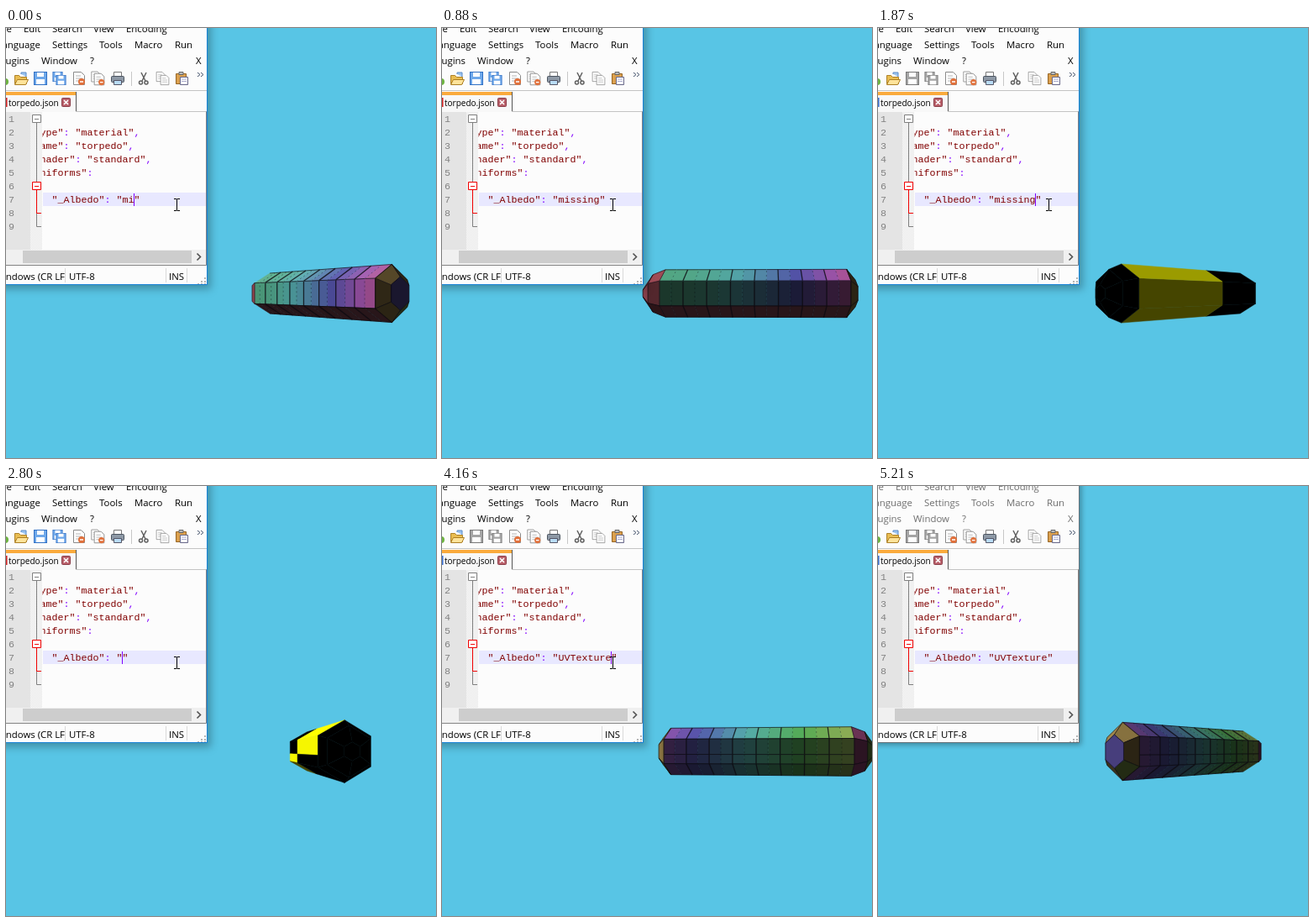
Write an HTML page with a canvas that moves like this. It is 512 px wide and 512 px high and loops after 5.31 s.

```html
<!DOCTYPE html>
<html lang="en">
<head>
<meta charset="utf-8">
<title>Live material editing</title>
<style>
  html, body { margin: 0; width: 100%; height: 100%; overflow: hidden; background: #58c5e5; }
  canvas, svg { position: absolute; left: 0; top: 0; width: 512px; height: 512px; }
  #frame { fill: #fcfcfc; stroke: #1883d7; filter: drop-shadow(4px 5px 5px #0004); }
  #ui, #tab { font: 11.4px "Open Sans", "Noto Sans", sans-serif; }
  #tab { font-size: 10px; }
  #code, #numbers { font: 11.667px "Liberation Mono", monospace; white-space: pre; }
  #code { fill: #800000; }
  #numbers { fill: #808080; }
  .end { text-anchor: end; }
  .punct { fill: #8000ff; }
  .inactive #menu { fill: #6d6d6d; }
  .inactive #frame { stroke: #66727a; filter: drop-shadow(2px 2px 3px #0005); }
  .disk { stroke: #2f6fc4; fill: #6fa8ea; }
  .saved .disk { stroke: #777; fill: #a5a5a5; }
</style>
</head>
<body>
<canvas id="scene" width="512" height="512"></canvas>
<svg id="window" viewBox="0 0 512 512">
  <defs>
    <clipPath id="editor"><rect x="43.5" y="100" width="195" height="163"/></clipPath>
    <pattern id="dots" width="2" height="2" patternUnits="userSpaceOnUse">
      <path d="M0 0h2v2h-2z" fill="#f8f8f8"/><path d="M0 0h1v1h-1zM1 1h1v1h-1z" fill="#e9e9e9"/>
    </pattern>
    <g id="page"><path d="M-6.5-7.5h9l4 4v11h-13z" fill="#fff" stroke="#8a8a8a"/><path d="M-4-3h6M-4 0h8M-4 3h8" stroke="#b5b5b5"/></g>
    <g id="close"><use href="#page"/><circle cx="3" cy="4" r="4" fill="#e0713c"/><path d="M1 4h4" stroke="#fff" stroke-width="1.5"/></g>
    <g id="floppy">
      <rect x="-7.5" y="-7.5" width="15" height="15"/>
      <path d="M-4-7h8v5h-8zM-5 1h10v6h-10z" fill="#fff" stroke="none"/>
    </g>
  </defs>

  <rect id="frame" x="-20" y="-20" width="259.5" height="325.5"/>

  <g id="ui">
    <g id="menu">
      <text class="end" x="7" y="5">File</text><text x="21" y="5">Edit</text><text x="55" y="5">Search</text>
      <text x="104" y="5">View</text><text x="143" y="5">Encoding</text>
      <text class="end" x="41" y="24">Language</text><text x="55" y="24">Settings</text><text x="111" y="24">Tools</text>
      <text x="153" y="24">Macro</text><text x="201" y="24">Run</text>
      <text class="end" x="28" y="43">Plugins</text><text x="42" y="43">Window</text><text x="100" y="43">?</text><text x="226" y="43">X</text>
    </g>

    <circle cx="-1" cy="64" r="4" fill="#6cb33f"/>
    <path d="M10.500 66.500v-10h5l2 2h7v8z" fill="#e9bd52" stroke="#ad8026"/>
    <path d="M10.500 67.500l3-6h13l-3 6z" fill="#ffe39a" stroke="#ad8026"/>
    <path d="M18 55v-2h6v5" fill="#9cc4f0" stroke="#5a8bc8"/>
    <g class="disk">
      <use href="#floppy" x="41" y="60"/>
      <use href="#floppy" transform="translate(61.500 58) scale(.75)"/>
      <use href="#floppy" transform="translate(65.500 62) scale(.75)"/>
    </g>
    <use href="#close" x="87" y="60"/>
    <use href="#page" transform="translate(107 58) scale(.8)"/>
    <use href="#close" transform="translate(111 61) scale(.9)"/>
    <path d="M128.500 58v-5.500h9v5.500" fill="#fff" stroke="#777"/>
    <rect x="125.500" y="57.500" width="15" height="7" rx="1" fill="#8e99a6" stroke="#4c5560"/>
    <path d="M128.500 62.500h9v5h-9z" fill="#b9dcf6" stroke="#556"/>
    <path d="M149.500 52v17" stroke="#c8c8c8"/>
    <g fill="none" stroke="#606060" stroke-width="1.500">
      <path d="M161 53l5 10M167 53l-5 10"/><circle cx="160.500" cy="65" r="2"/><circle cx="167" cy="65" r="2"/>
    </g>
    <use href="#page" transform="translate(184 58) scale(.75)"/><use href="#page" transform="translate(189 62) scale(.75)"/>
    <path d="M202.500 54.500h12v12h-12z" fill="#dba04e" stroke="#946425"/><path d="M206 52.500h5v3h-5z" fill="#bbb" stroke="#666"/>
    <path d="M207.500 58.500h9v9h-9z" fill="#fff" stroke="#668"/><path d="M209 61h6M209 63.500h6" stroke="#aac"/>
    <path d="M228 53l3 2.500-3 2.500M232 53l3 2.500-3 2.500" fill="none" stroke="#42506a"/>

    <path d="M0 74.500h239M83 99.500h156" stroke="#c4c4c4"/>
    <path d="M0 76h83v24h-83z" fill="#f8f8f8"/><path d="M0 76h83v4h-83z" fill="#faaa3c"/>
    <path d="M83.500 76v23" stroke="#555"/>
    <rect id="state" x="0" y="83" width="1.500" height="11"/>
    <text id="tab" x="3" y="93">torpedo.json</text>
    <rect x="66.500" y="83.500" width="10" height="10" rx="1" fill="#b9606a" stroke="#8a3d48"/>
    <path d="M69 86l5 5M74 86l-5 5" stroke="#fff" stroke-width="1.600"/>

    <path d="M0 100h29v164h-29z" fill="#e4e4e4"/><path d="M29 100h14v164h-14z" fill="url(#dots)"/>
    <path d="M44 196h194v16h-194z" fill="#e8e8ff"/>
    <g id="numbers"></g>
    <g fill="none" stroke="#808080">
      <path d="M36.500 113v70M36.500 220v16.500h5.500"/><path d="M31.500 103.500h10v9h-10zM34 108.500h5" fill="#fff"/>
      <g stroke="#f00000"><path d="M36.500 193v27.500h5.500"/><path d="M31.500 183.500h10v9h-10zM34 188.500h5" fill="#fff"/></g>
    </g>
    <g id="code" clip-path="url(#editor)"></g>
    <path id="caret" d="M0 197v15" stroke="#8000ff"/>

    <path d="M0 264h238v18h-238z" fill="#f0f0f0"/><path d="M20 265h201v15h-201z" fill="#cdcdcd"/>
    <path d="M227.500 268.500l4 4-4 4" fill="none" stroke="#505050" stroke-width="1.600"/>
    <path d="M0 282.500h238.500v-183" fill="none" stroke="#828282"/>
    <path d="M70.500 286v17M190.500 286v17M215.500 286v17" stroke="#d9d9d9"/>
    <text class="end" x="70" y="300">Windows (CR LF</text><text x="75" y="300">UTF-8</text><text x="194" y="300">INS</text>
    <path d="M236 297h2v2h-2zM236 301h2v2h-2zM232 301h2v2h-2zM228 304h2v1h-2zM232 304h2v1h-2zM236 304h2v1h-2z" fill="#b4b4b4"/>
  </g>
  <path id="pointer" d="M-3.500-6.500h3l.5 1 .5-1h3M0-6v13M-3.500 7.500h3l.5-1 .5 1h3" fill="none" stroke="#000"/>
</svg>

<script>
const LOOP = 5310, STEP = 58.5, LAST_STEP = 89;
const byId = id => document.getElementById(id);
const ctx = byId("scene").getContext("2d");
const clamp = (v, lo, hi) => Math.max(lo, Math.min(hi, v));
const mix = (a, b, f) => a + (b - a) * f;

// Editor text
const LINE_START = 54.5, CHAR = 7;
const lines = { 2: '"type": "material",', 3: '"name": "torpedo",', 4: '"shader": "standard",', 5: '"uniforms":' };
const baseline = line => 96 + 16 * line;
const colorize = s => s.replace(/[:,]/g, '<tspan class="punct">$&</tspan>');
const textLine = (x, line, s) => `<text x="${x}" y="${baseline(line)}">${colorize(s)}</text>`;

byId("numbers").innerHTML = Array.from({ length: 9 }, (_, i) => textLine(3, i + 1, String(i + 1))).join("");
byId("code").innerHTML = Object.entries(lines).map(([n, s]) => textLine(26.5, +n, s)).join("")
  + `<text id="albedo" x="${LINE_START}" y="${baseline(7)}"></text>`;

function typedValue(n) {
  if (n < 41) return "missing".slice(0, 2 + n);
  if (n < 51) return "missing".slice(0, Math.max(0, 47 - n));
  return "UVTexture".slice(0, 1 + Math.floor((n - 51) / 1.5));
}

function drawEditor(n) {
  const value = typedValue(n);
  const inactive = n >= 88;
  const saved = (n >= 27 && n < 41) || n >= 67;
  byId("window").setAttribute("class", (saved ? "saved " : "") + (inactive ? "inactive" : ""));
  byId("state").setAttribute("fill", saved ? "#3a6fd0" : "#d02020");
  byId("albedo").innerHTML = colorize(`"_Albedo": "${value}"`);

  const lastEdit = n < 41 ? Math.min(n, 5) : n < 51 ? Math.min(n, 47) : Math.min(n, 63);
  const caretOn = !inactive && Math.floor((n - lastEdit) / 9.1) % 2 === 0;
  byId("caret").setAttribute("transform", `translate(${LINE_START + CHAR * (12 + value.length)})`);
  byId("caret").style.display = caretOn ? "" : "none";

  const up = clamp((n - 73) / 5, 0, 1), down = clamp((n - 78) / 6, 0, 1);
  const x = 203.5 - 31 * up + 28 * down, y = 210 - 68 * up + 390 * down;
  byId("pointer").setAttribute("transform", `translate(${x} ${y})`);
}

// Torpedo: a hexagonal body along axis u, with a blunt tail and a pointed nose
const CENTER = [375, 316], CAMERA = 450, RADIUS = 28.4, TAIL = -106, NOSE = 110;
const TAIL_END = [-116, 16], NOSE_END = [135, 8];
const LIGHT = [-0.71, 0.71, 0], AMBIENT = 0.27, CHECK_SPLIT = -26;
const CAPS = [[...TAIL_END, TAIL, RADIUS], [NOSE, RADIUS, 125, 22.5], [125, 22.5, ...NOSE_END]];

const dot = (a, b) => a[0] * b[0] + a[1] * b[1] + a[2] * b[2];
const minus = (a, b) => a.map((v, i) => v - b[i]);
const cross = (a, b) => [a[1] * b[2] - a[2] * b[1], a[2] * b[0] - a[0] * b[2], a[0] * b[1] - a[1] * b[0]];
const project = ([x, y, z]) => {
  const s = CAMERA / (CAMERA - z);
  return [CENTER[0] + x * s, CENTER[1] - y * s];
};

function tracePath(points, closed) {
  ctx.beginPath();
  points.forEach(p => ctx.lineTo(...project(p)));
  if (closed) ctx.closePath();
}

function drawFace(points, color) {
  let normal = cross(minus(points[1], points[0]), minus(points[2], points[0]));
  const size = Math.hypot(...normal) * Math.sign(dot(normal, points[0]));
  normal = normal.map(v => v / size);
  if (dot(normal, minus([0, 0, CAMERA], points[0])) <= 0) return false;
  const shade = Math.min(1, AMBIENT + Math.max(0, dot(normal, LIGHT)));
  const [h, s, l] = color;
  ctx.fillStyle = ctx.strokeStyle = `hsl(${h} ${s}% ${l * shade}%)`;
  ctx.lineWidth = 0.5;
  tracePath(points, true);
  ctx.fill();
  ctx.stroke();
  return true;
}

function drawLine(points, alpha, width, dash = []) {
  ctx.strokeStyle = `rgba(12,8,14,${alpha})`;
  ctx.lineWidth = width;
  ctx.setLineDash(dash);
  tracePath(points, false);
  ctx.stroke();
  ctx.setLineDash([]);
}

function bodyColor(k, u) {
  const t = (u - TAIL) / (NOSE - TAIL);
  if (k === 5) return [345, 30, 45];
  const near = k < 2;
  const hue = near ? 155 + 165 * (1 - t) ** 2 : 80 + 200 * (1 - t) ** 1.2;
  return [hue, 34, 54];
}

function drawTorpedo(n) {
  const yaw = (221 + 3.13 * n) * Math.PI / 180, sin = Math.sin(yaw), cos = Math.cos(yaw);
  const checker = n >= 28 && n < 69;
  const black = [0, 0, 0];

  // Point on side k, at fraction f between its two corners
  const at = (u, r, k, f) => {
    const a = (60 * k - 30) * Math.PI / 180, b = a + Math.PI / 3;
    const p = r * mix(Math.cos(a), Math.cos(b), f), y = r * mix(Math.sin(a), Math.sin(b), f);
    return [u * sin + p * cos, y, u * cos - p * sin];
  };
  const quad = (u0, r0, u1, r1, k, f0 = 0, f1 = 1) =>
    [at(u0, r0, k, f0), at(u1, r1, k, f0), at(u1, r1, k, f1), at(u0, r0, k, f1)];

  ctx.fillStyle = "#58c5e5";
  ctx.fillRect(0, 0, 512, 512);
  ctx.lineJoin = "round";

  const stations = checker ? [TAIL, CHECK_SPLIT, NOSE]
    : Array.from({ length: 17 }, (_, i) => mix(TAIL, NOSE, i / 16));
  const sides = [0, 1, 2, 3, 4, 5];

  for (const k of sides) {
    const rows = k === 3 ? [0, 0.62, 1] : [0, 1];
    for (let row = 0; row < rows.length - 1; row++) {
      const flipped = k === 4 || (k === 3 && row === 1);
      for (let i = 0; i < stations.length - 1; i++) {
        const [u0, u1] = [stations[i], stations[i + 1]];
        const yellow = (u0 >= CHECK_SPLIT) !== flipped;
        const color = checker ? (yellow ? [60, 100, 50] : black) : bodyColor(k, (u0 + u1) / 2);
        const q = quad(u0, RADIUS, u1, RADIUS, k, rows[row], rows[row + 1]);
        if (!drawFace(q, color) || checker) continue;
        drawLine([q[0], q[1]], 0.65, 1);
        drawLine([q[3], q[2]], 0.65, 1);
        if (i % 2) drawLine([q[0], q[3]], 0.35, 1, [2, 3]);
        else drawLine([q[0], q[3]], 0.8, 1.3);
      }
    }
    CAPS.forEach(([u0, r0, u1, r1], i) => {
      const nearSide = k < 2 || k === 5;
      const hue = i === 0 ? (k === 4 ? 80 : 42) : nearSide ? 352 : i === 1 ? 325 : 90;
      const q = quad(u0, r0, u1, r1, k);
      if (drawFace(q, checker ? black : [hue, 36, 46]) && !checker) drawLine([...q, q[0]], 0.6, 1);
    });
  }

  for (const [[u, r], hue] of [[TAIL_END, 248], [NOSE_END, 20]]) {
    const end = sides.map(k => at(u, r, k, 0));
    if (drawFace(end, checker ? black : [hue, 33, 50]) && !checker) drawLine([...end, end[0]], 0.6, 1);
  }
}

function render() {
  const t = performance.now() % LOOP;
  const n = Math.min(LAST_STEP, Math.floor(t / STEP + 0.25));
  drawTorpedo(n);
  drawEditor(n);
  requestAnimationFrame(render);
}
render();
</script>
</body>
</html>
```
